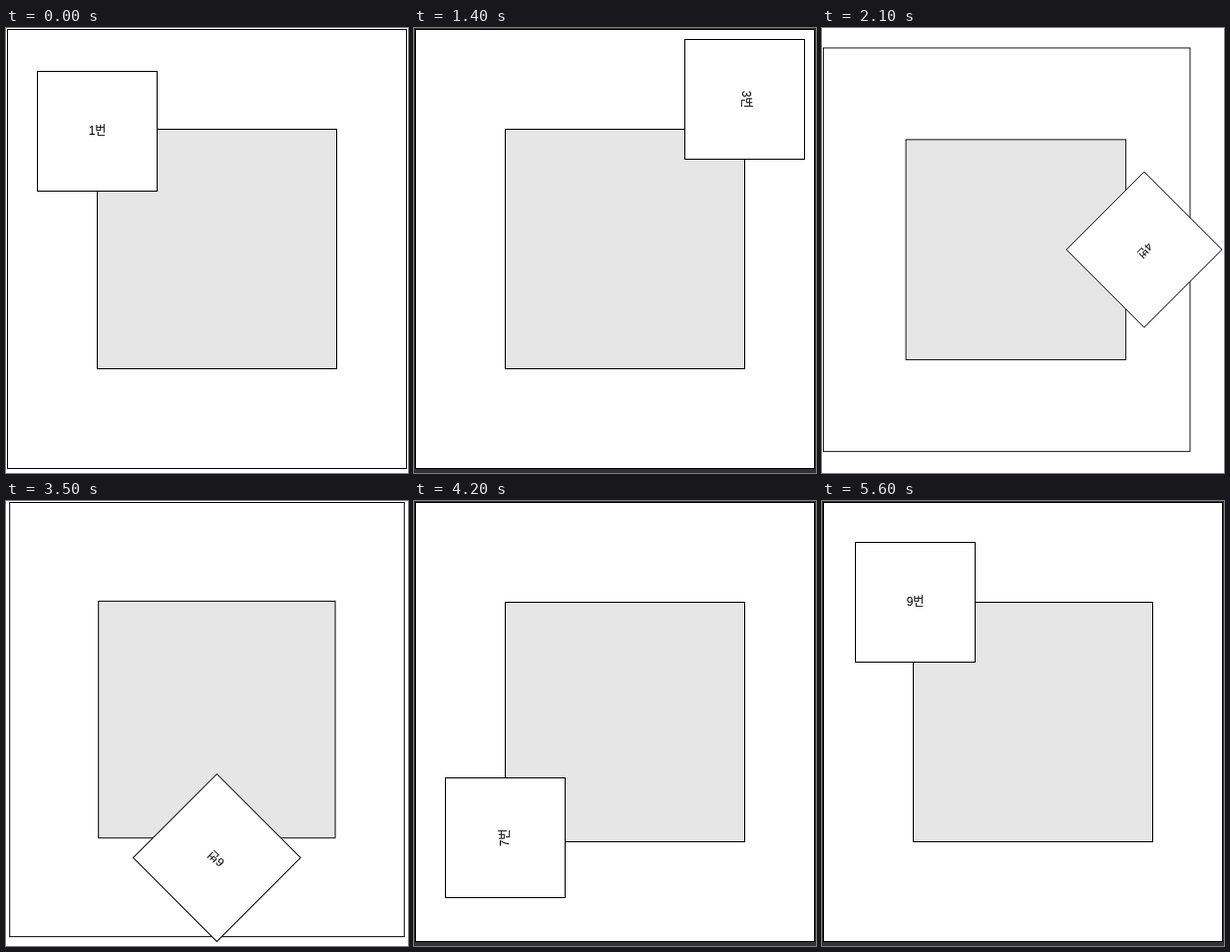
An HTML page that plays this animation: 403 px wide and 446 px high, repeating every 6300 ms.

```html
<!DOCTYPE html>
<html lang="ko">
<head>
<meta charset="utf-8">
<style>
  html, body { margin: 0; width: 100%; height: 100%; overflow: hidden; background: #fff; }
  svg { display: block; }
  rect { stroke: #000; fill: #fff; }
  text { font: 12px "Liberation Sans", "Noto Sans CJK KR", "Noto Sans CJK", sans-serif; text-anchor: middle; }
</style>
</head>
<body>
<svg width="403" height="446" viewBox="0 0 403 446">
  <path id="backdrop" d="M0 0H403V446H0Z" fill="#323234"/>
  <g id="scene">
    <rect x="1.5" y="1.5" width="400" height="440"/>
    <rect x="91.5" y="101.5" width="240" height="240" style="fill:#e6e6e6"/>
    <g id="card">
      <rect x="-60" y="-60" width="120" height="120"/>
      <text id="label" y="3"></text>
    </g>
  </g>
</svg>
<script>
const STEP_MS = 700;
// Card centre; tilted cards overflow the frame, so their view shrinks: [scale, dx, dy].
const steps = [
  { x: 91.5, y: 103.5 },
  { x: 211.5, y: 81.5, view: [0.985, 3, 6.7] },
  { x: 331.5, y: 71.5, dark: true },
  { x: 351.5, y: 221.5, view: [0.919, 0, 18.6] },
  { x: 331.5, y: 341.5, dark: true },
  { x: 211.5, y: 361.5, view: [0.989, 2.2, 0] },
  { x: 91.5, y: 337.5, dark: true },
  { x: 71.5, y: 221.5, view: [0.964, 14.5, 8] },
  { x: 93.5, y: 101.5, dark: true }
];
const [backdrop, scene, card, label] =
  ["backdrop", "scene", "card", "label"].map(id => document.getElementById(id));
let shown = -1;

function show(index) {
  const { x, y, dark = false, view: [scale, dx, dy] = [1, 0, 0] } = steps[index];
  backdrop.setAttribute("visibility", dark ? "visible" : "hidden");
  scene.setAttribute("transform", `translate(${dx} ${dy}) scale(${scale})`);
  card.setAttribute("transform", `translate(${x} ${y}) rotate(${index * 45})`);
  label.textContent = `${index + 1}번`;
  shown = index;
}

const start = performance.now();
function tick() {
  const index = Math.floor((performance.now() - start) / STEP_MS) % steps.length;
  if (index !== shown) show(index);
  requestAnimationFrame(tick);
}
tick();
</script>
</body>
</html>
```
